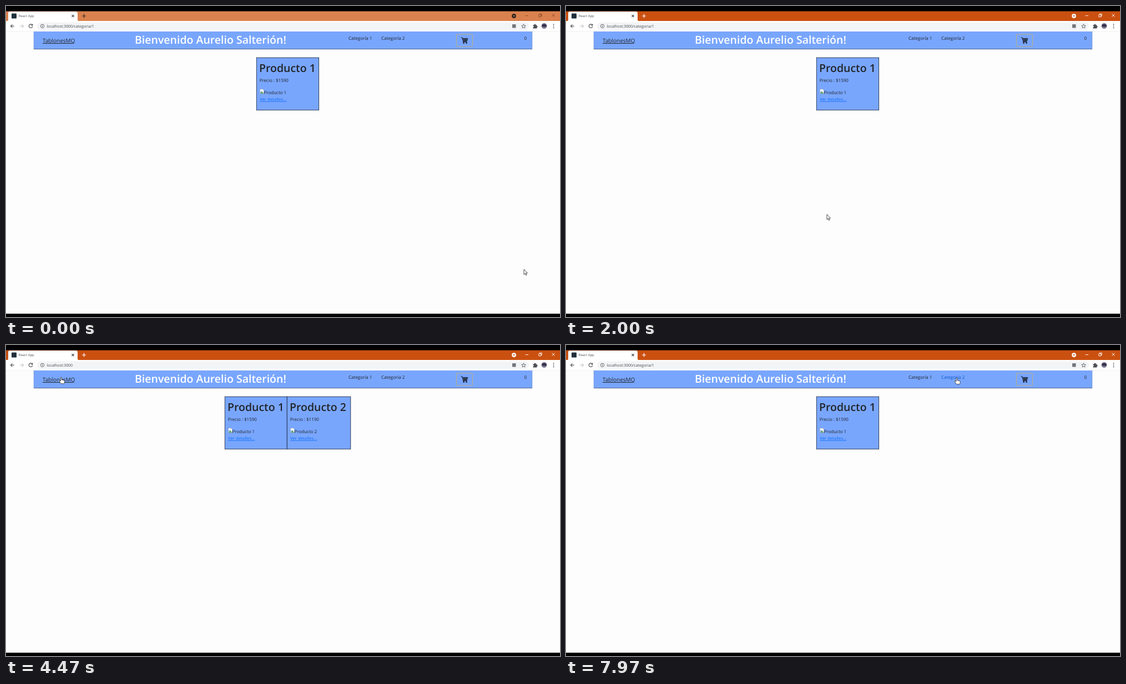
An HTML page that plays this animation: 998 by 561 pixels, repeating every 8 s.

```html
<!DOCTYPE html>
<html lang="es">
<head>
<meta charset="utf-8">
<title>Tienda</title>
<style>
  html, body { margin: 0; width: 100%; height: 100%; overflow: hidden; background: #000; }
  svg { display: block; width: 100vw; height: 100vh; }
  text { font-family: "Open Sans", "Noto Sans", sans-serif; font-size: 8px; fill: #212529; text-rendering: geometricPrecision; white-space: pre; }
  .h1 { font-size: 19.5px; font-weight: 600; }
  .link { font-size: 7.75px; fill: #0d6efd; text-decoration: underline; }
  .line { fill: none; stroke: #45484c; stroke-width: 1.1; }
</style>
</head>
<body>
<svg viewBox="0 0 998 561" xmlns="http://www.w3.org/2000/svg">
  <defs>
    <g id="card">
      <text class="h1" x="6" y="26">Producto</text>
    </g>
    <g id="broken">
      <path d="M.5.5h5l2 2v6h-7z" fill="#fff" stroke="#8c949e" stroke-width=".6"/>
      <path d="M1 5l2-2 2.5 2.5L1 8z" fill="#a9c8f5"/>
      <path d="M1 8.2l3-3.4 3.2 3.4z" fill="#4a9c48"/>
    </g>
  </defs>

  <rect y="9" width="998" height="546" fill="#fdfdfd"/>

  <!-- Browser window -->
  <rect id="titleBar" y="9" width="998" height="18.5"/>
  <path d="M1 27.5q3 0 3-3V13q0-3 3-3h119q3 0 3 3v11.500q0 3 3 3z" fill="#fff"/>
  <rect y="27" width="998" height="19" fill="#fff"/>
  <rect x="56" y="29.500" width="886" height="13.500" rx="6.750" fill="#f3f4f6"/>
  <path d="M0 45.700h998" stroke="#e6e7e9" stroke-width=".6"/>
  <rect x="10" y="13.500" width="9" height="9" rx="1" fill="#20303c"/>
  <text x="22.700" y="20.300" style="font-size:6px;fill:#50545a">React App</text>
  <path class="line" d="M118.500 16l4 4m0-4l-4 4"/>
  <path id="plus" d="M137 18h7m-3.500-3.500v7" fill="none" stroke-width="1.200"/>
  <circle id="menuDot" cx="915" cy="18" r="3.900"/>
  <path id="menuArrow" d="M913 17h4l-2 2.400z"/>
  <path id="controls" d="M935.500 17.500h5.500M959.800 15.700h4v4h-4zM961.200 15.500v-1.300h4v4h-1.300M983.500 14.500l5 5m0-5l-5 5" fill="none" stroke-width=".9"/>

  <path class="line" d="M15 36.300H8.500m3-3l-3 3 3 3"/>
  <path class="line" d="M25 36.300h6.500m-3-3l3 3-3 3" style="stroke:#c3c5c8"/>
  <path class="line" d="M47.300 34.300a3.300 3.300 0 1 0 .5 2.500M47.800 32.500v2.500h-2.500"/>
  <circle class="line" cx="65.500" cy="36.300" r="3.200" style="stroke-width:.8"/>
  <path class="line" d="M65.500 35.800v2.200m0-3.800v.8" style="stroke-width:.9"/>
  <text id="url" x="73.500" y="38.900" style="font-size:6.900px;fill:#44484d"></text>
  <rect x="912" y="33" width="6.500" height="6.500" fill="#73777c"/>
  <path class="line" d="M932.500 32.700l1.050 2.500 2.750.2-2.100 1.800.7 2.700-2.400-1.500-2.400 1.500.7-2.700-2.100-1.800 2.750-.2z" style="stroke-width:.8"/>
  <path d="M949.500 34.300h2.200q-.2-2 1.200-2t1.200 2h2.200v2q1.500.1 1.500 1.200t-1.500 1.200v1.800h-6.800v-2.300q1.500-.1 1.500-1t-1.500-1z" fill="#4b4e53"/>
  <circle cx="969.500" cy="36" r="5" fill="#77748f"/>
  <path d="M965 36a4.700 4.700 0 0 1 9 0q-4 3-9 0z" fill="#34324b"/>
  <g fill="#45484c"><circle cx="986.500" cy="33.200" r=".9"/><circle cx="986.500" cy="36.300" r=".9"/><circle cx="986.500" cy="39.400" r=".9"/></g>

  <!-- Navigation -->
  <rect x="50" y="46" width="898" height="32" fill="#79a6fd"/>
  <path d="M50 77.700h898" stroke="#4a5f91"/>
  <path d="M50.200 46v32m897.600 0v-32" stroke="#6d8fd2" stroke-width=".6"/>
  <text x="66" y="66" style="font-size:10px;text-decoration:underline">TablonesMQ</text>
  <text class="h1" x="232" y="68" style="fill:#fff">Bienvenido Aurelio Salterión!</text>
  <text id="cat1" x="617" y="61">Categoría 1</text>
  <text id="cat2" x="676" y="61">Categoría 2</text>
  <rect x="811.500" y="51" width="29" height="22" rx="2" fill="none" stroke="#d5b648" stroke-width=".7"/>
  <g fill="none" stroke="#1c2430" stroke-width="1.200">
    <path d="M819.500 57h2.300l2 7.200h6.500M822.300 58.700h9.200l-1.300 4.200h-6.800M822.800 60.700h8M825.300 58.700l.7 4.200m2.500-4.200l-.3 4.200"/>
    <circle cx="824.600" cy="66.300" r="1"/><circle cx="829.500" cy="66.300" r="1"/>
  </g>
  <text x="933.500" y="61">0</text>

  <g id="products"></g>
  <g id="pointer" stroke="#222" stroke-width=".8" stroke-linejoin="round" fill="#fff">
    <path id="arrow" d="M0 0v9.300l2.100-1.900 1.500 3.200 1.400-.6-1.500-3.200h2.900z"/>
    <path id="hand" d="M-1 1a1 1 0 0 1 2 0v3.800l4 .9q1.500.4 1.300 2l-.6 2.500q-.3 1.600-1.500 1.600H.4q-.8 0-1.400-.8l-3-4.200q.4-1.500 1.800-.6l1.200.9z"/>
  </g>
  <rect width="998" height="9.500" fill="#000"/>
  <rect y="555" width="998" height="6" fill="#000"/>
</svg>
<script>
const LOOP = 8000, FOCUS = 1530, HOME = 3000, CATEGORY = 6800;
const $ = id => document.getElementById(id);

// Pointer path: time, x, y
const path = [
  [0, 933, 475], [30, 933, 475], [430, 726, 451], [830, 590, 500], [870, 590, 500],
  [1030, 575, 557], [1529, 545, 557], [1530, 545, 538], [1730, 470, 376], [2000, 470, 376],
  [2570, 104, 75], [2800, 99.500, 58], [4570, 99.500, 58], [4770, 97, 60], [5070, 97, 60],
  [5200, 92, 60], [5570, 526, 166], [5730, 526, 166], [6430, 628.500, 58.300],
  [7400, 628.500, 58.300], [7900, 704, 59], [LOOP, 704, 59]
];

const clamp = v => Math.min(1, Math.max(0, v));
const ramp = (t, start, length = 150) => clamp((t - start) / length);
const inside = (x, y, l, t, r, b) => x >= l && x <= r && y >= t && y <= b;

function pointerAt(t) {
  const i = Math.max(1, path.findIndex(p => p[0] > t));
  const [t0, x0, y0] = path[i - 1], [t1, x1, y1] = path[i];
  const k = clamp((t - t0) / (t1 - t0)), e = k * k * (3 - 2 * k);
  return [x0 + (x1 - x0) * e, y0 + (y1 - y0) * e];
}

function card(x, width, number, price) {
  return `<g transform="translate(${x} 93)">
    <rect x=".3" y=".2" width="${width}" height="94.600" fill="#79a6fd" stroke="#1e2c4a" stroke-width=".9"/>
    <text class="h1" x="5" y="26">Producto ${number}</text>
    <text x="5.700" y="43.500">Precio : $${price}</text>
    <use href="#broken" x="6" y="56.500"/>
    <text x="13.500" y="65.500">Producto ${number}</text>
    <text class="link" x="6" y="78">Ver detalles...</text>
  </g>`;
}

const pages = {
  home: { url: "localhost:3000", cards: card(394, 112, 1, 1590) + card(506, 114.500, 2, 1190) },
  category: { url: "localhost:3000/categoria/1", cards: card(451, 112.300, 1, 1590) }
};
let shown;

function showPage(name) {
  if (name === shown) return;
  shown = name;
  $("url").textContent = pages[name].url;
  $("products").innerHTML = pages[name].cards;
}

function showFocus(active) {
  const ink = active ? "#fff" : "#8a4a28";
  $("titleBar").setAttribute("fill", active ? "#ca5010" : "#da824f");
  $("plus").setAttribute("stroke", active ? "#fff" : "#352820");
  $("controls").setAttribute("stroke", ink);
  $("menuDot").setAttribute("fill", active ? "#fff" : "#2d2520");
  $("menuArrow").setAttribute("fill", active ? "#ca5010" : "#da824f");
}

function tint(id, k) {
  const from = [33, 37, 41], to = [10, 88, 202];
  $(id).style.fill = `rgb(${from.map((c, i) => Math.round(c + (to[i] - c) * k))})`;
}

function overLink(x, y, home) {
  return inside(x, y, 66, 55, 125, 69) || inside(x, y, 609, 48, 727, 66) ||
    (home && (inside(x, y, 400, 162, 447, 173) || inside(x, y, 512, 162, 560, 173)));
}

function draw(t) {
  const home = t >= HOME && t < CATEGORY;
  showPage(home ? "home" : "category");
  showFocus(t >= FOCUS);
  tint("cat1", ramp(t, 6430) - ramp(t, 7650));
  tint("cat2", ramp(t, 7650));
  const [x, y] = pointerAt(t), link = overLink(x, y, home);
  $("pointer").setAttribute("transform", `translate(${x} ${y})`);
  $("arrow").style.display = link ? "none" : "";
  $("hand").style.display = link ? "" : "none";
}

const start = performance.now();
function tick() {
  draw((performance.now() - start) % LOOP);
  requestAnimationFrame(tick);
}
tick();
</script>
</body>
</html>
```
